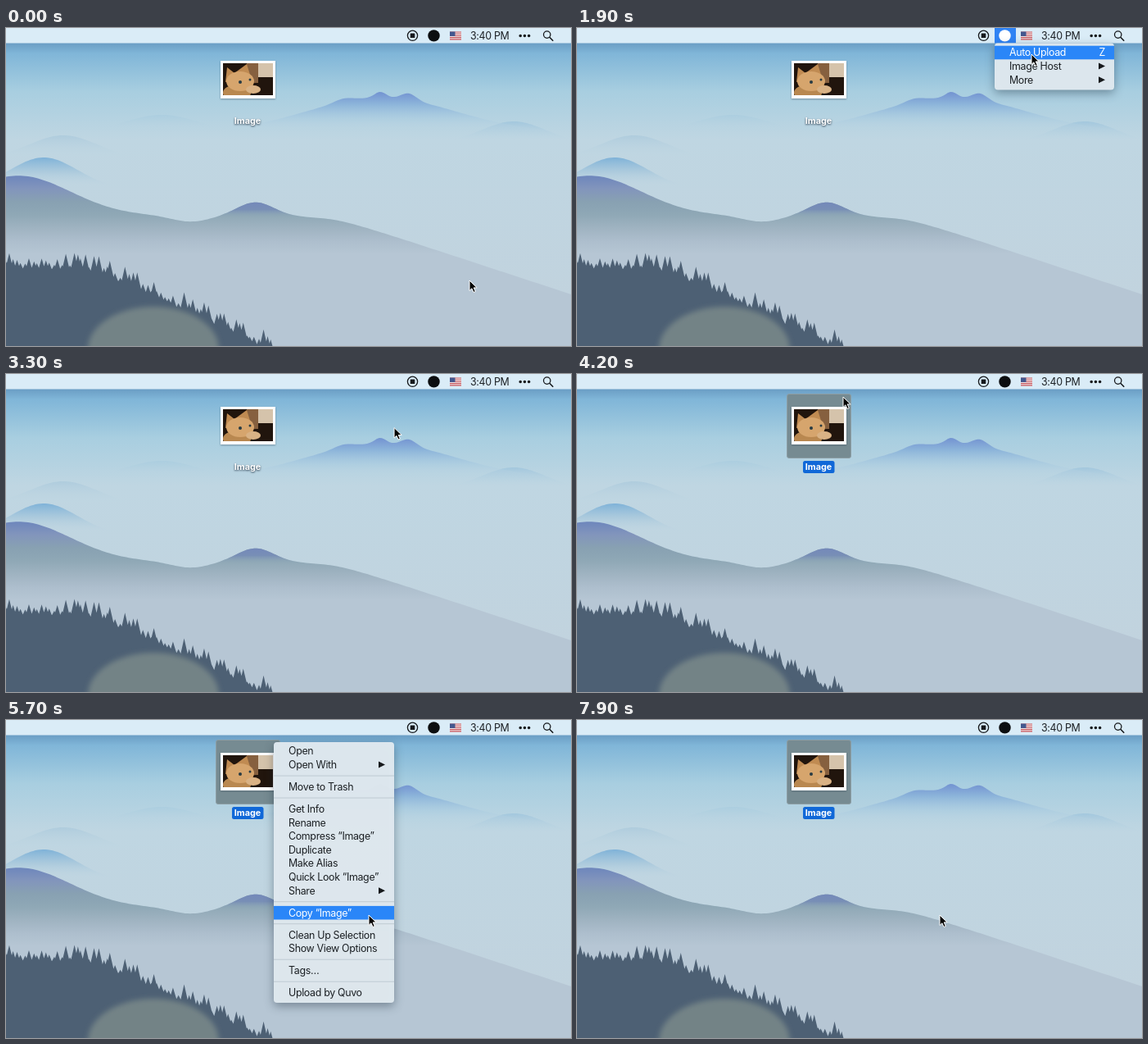
These frames come from a looping animation (690x388 px, 8000 ms). An HTML page:

```html
<!DOCTYPE html>
<html lang="en">
<head>
<meta charset="utf-8">
<title>Desktop upload</title>
<style>
  html, body { margin: 0; width: 100%; height: 100%; overflow: hidden; background: #c4d8e4; }
  svg { display: block; width: 690px; height: 388px; }
  text { font: 12.4px Inter, Roboto, sans-serif; letter-spacing: -.32px; fill: #1c2024; }
  .end { text-anchor: end; }
  #label { font-size: 10.8px; font-weight: 700; letter-spacing: 0; fill: #fff; text-anchor: middle; }
  .plain { filter: drop-shadow(0 1px 1.2px #234); }
  .menu { filter: drop-shadow(0 4px 6px #1236); }
  .on rect { fill: #2a86f8; }
  .on text, .on path { fill: #fff; }
</style>
</head>
<body>
<svg viewBox="0 0 690 388">
  <defs>
    <linearGradient id="sky" x2="0" y2="1">
      <stop offset=".05" stop-color="#6c9fc6"/>
      <stop offset=".08" stop-color="#80b6d8"/>
      <stop offset=".2" stop-color="#a8cee0"/>
      <stop offset=".35" stop-color="#bfd6e2"/>
      <stop offset="1" stop-color="#c2d2dd"/>
    </linearGradient>
    <clipPath id="photo"><rect x="265" y="43" width="61" height="39"/></clipPath>
    <filter id="soft"><feGaussianBlur stdDeviation="3"/></filter>
  </defs>
  <rect width="690" height="388" fill="url(#sky)"/>
  <g id="land"></g>

  <g id="selection">
    <rect x="256.5" y="24.500" width="78" height="78" rx="2.500" fill="#768b92" stroke="#8d9ea4"/>
    <rect x="276" y="106" width="38.500" height="15" rx="2.500" fill="#1068d8"/>
  </g>
  <rect x="262" y="40" width="67" height="46" fill="#fff" style="filter:drop-shadow(0 1px 1px #3457)"/>
  <g clip-path="url(#photo)">
    <rect x="265" y="43" width="61" height="39" fill="#21150d"/>
    <rect x="294" y="43" width="14" height="24" fill="#86603f"/>
    <rect x="308" y="43" width="18" height="17" fill="#d5c3ab"/>
    <ellipse cx="282" cy="79" rx="17" ry="10" fill="#b98850"/>
    <path d="M268 66l2-18 9 7 15-11 5 16z" fill="#c08b52"/>
    <ellipse cx="286" cy="65" rx="17" ry="12" fill="#d6a56d"/>
    <ellipse cx="302" cy="75" rx="9" ry="5" fill="#d9b285"/>
    <circle cx="286" cy="66" r="2" fill="#273b43"/>
    <circle cx="298" cy="63" r="1.500" fill="#273b43"/>
  </g>
  <text id="label" x="295" y="117.300">Image</text>

  <rect width="690" height="18.500" fill="#daecf7"/>
  <rect id="active" x="510" width="26" height="18.500" fill="#2f83f4"/>
  <g fill="none" stroke="#16191c" stroke-width="1.300">
    <circle cx="496.500" cy="9.300" r="6.100"/>
    <circle cx="660.700" cy="8.100" r="4.200"/>
    <path d="M663.800 11.300l4.400 4.400" stroke-width="1.600"/>
    <path d="M628.200 9.500h10.500" stroke-width="3.600" stroke-linecap="round" stroke-dasharray="0 5.200"/>
  </g>
  <rect x="493.700" y="6.500" width="5.600" height="5.600" rx=".6" fill="#16191c"/>
  <circle id="app" cx="522.500" cy="9.400" r="7.200"/>
  <g id="progress" transform="translate(522.500 9.400)" fill="#16191c">
    <circle r="6.700" fill="none" stroke="#16191c" stroke-width="1.300"/><path id="wedge"/>
  </g>
  <rect x="542" y="4.500" width="14" height="10" fill="#f4eeee"/>
  <path d="M549 4.500v10" stroke="#c4525a" stroke-width="14" stroke-dasharray="1.100"/>
  <rect x="542" y="4.500" width="6.500" height="5.400" fill="#42588f"/>
  <text x="567" y="13.800">3:40 PM</text>

  <g id="menus"></g>
  <circle id="ring" cx=".5" cy="1" r="19" fill="#fff3" stroke="#111" stroke-width="1.500"/>
  <path id="cursor" d="M0 0v12.500l2.900-2.700 2.100 4.700 2.300-1-2.100-4.600h4z" fill="#050505" stroke="#fff" stroke-linejoin="round"/>
</svg>
<script>
const $ = id => document.getElementById(id);

function add(parent, tag, attrs, text) {
  const el = document.createElementNS('http://www.w3.org/2000/svg', tag);
  for (const k in attrs) el.setAttribute(k, attrs[k]);
  if (text) el.textContent = text;
  parent.append(el);
  return el;
}

// Landscape: every ridge is a base line with bell-shaped peaks.
const bell = (x, center, height, width) => height * Math.exp(-(((x - center) / width) ** 2));
const ramp = x => (x + Math.hypot(x, 30)) / 2;

let fades = 0;
function hill(ridge, [left, right], [top, bottom], colors) {
  let d = `M${left} 388`;
  for (let x = left; x <= right; x += 3) d += `L${x} ${ridge(x).toFixed(1)}`;
  const id = 'fade' + fades++;
  const fade = add($('land'), 'linearGradient', { id, gradientUnits: 'userSpaceOnUse', x1: 0, x2: 0, y1: top, y2: bottom });
  colors.forEach((c, i) => add(fade, 'stop', { offset: i / (colors.length - 1), 'stop-color': c }));
  add($('land'), 'path', { d: d + `V388Z`, fill: `url(#${id})` });
}

const wide = [0, 690];
hill(x => 160 - bell(x, 70, 29, 60), wide, [131, 158], ['#a5c6da99', '#bfd6e200']);
hill(x => 128 - bell(x, 190, 22, 65), wide, [106, 126], ['#a5cade88', '#bfd6e200']);
hill(x => 140 - bell(x, 620, 26, 55), wide, [114, 138], ['#9cc3dcbb', '#bfd6e200']);
hill(x => 128 - bell(x, 458, 43, 130) - bell(x, 457, 7, 10) - bell(x, 492, 8, 13) - bell(x, 412, 4, 16),
  wide, [76, 126], ['#6f8ed0', '#8cb4da', '#a9cbe0aa', '#bfd6e200']);
hill(x => 196 - bell(x, 46, 38, 58), wide, [158, 193], ['#7fb2d8', '#a8c8dccc', '#bfd6e200']);

const near = x => 229 + .33 * ramp(x - 400) - bell(x, 15, 49, 90) + bell(x, 225, 7, 32) - bell(x, 305, 17, 32);
hill(near, wide, [180, 276], ['#6d86bc', '#8295bc', '#88a1b2', '#8fa8b6', '#9fb3c1', '#adbecd', '#b6c6d4']);
hill(near, [225, 420], [212, 231], ['#7388ba', '#788fb6', '#8ea8b700']);

// Pine forest on a falling slope, with mist at its foot.
let seed = 11;
const rand = () => (seed = seed * 16807 % 2147483647) / 2147483647;
const ground = x => 292 + .47 * ramp(x - 108);
let forest = 'M-10 388';
for (let x = -10; x <= 330; x += 5) forest += `L${x} ${ground(x)}`;
forest += 'V388Z';
for (let x = -4; x < 325; x += 3 + rand() * 4) {
  const h = 5 + 17 * rand() ** 1.6, w = 2.5 + h / 6, y = ground(x) - h;
  for (let tier = 1; tier <= 3; tier++)
    forest += `M${x} ${y}L${x + w * tier / 3} ${y + h * tier / 2.4}H${x - w * tier / 3}Z`;
}
add($('land'), 'path', { d: forest, fill: '#4d6074' });
add($('land'), 'ellipse', { cx: 180, cy: 392, rx: 80, ry: 52, fill: '#738386', filter: 'url(#soft)' });

// Rows are "Label", "Label>" for a submenu, "Label|Key" for a shortcut, "" for a divider.
const ROW = 16.6;
function makeMenu(x, y, w, h, first, rows) {
  const g = add($('menus'), 'g', { class: 'menu' }), items = [];
  add(g, 'rect', { x, y, width: w, height: h, rx: 4, fill: '#e0eaf0', 'fill-opacity': .97 });
  let cy = first;
  for (const row of rows) {
    if (!row) {
      add(g, 'rect', { x, y: cy - 3.8, width: w, height: 1.3, fill: '#c5d0d7' });
      cy += 10.4;
      continue;
    }
    const [label, key] = row.replace('>', '').split('|');
    const el = add(g, 'g', {});
    add(el, 'rect', { x, y: cy - ROW / 2, width: w, height: ROW, fill: 'none' });
    add(el, 'text', { x: x + 18, y: cy + 4.4 }, label);
    if (key) add(el, 'text', { x: x + w - 11, y: cy + 4.4, class: 'end' }, key);
    if (row.endsWith('>')) add(el, 'path', { d: `M${x + w - 19},${cy - 4}l8,4 -8,4Z`, fill: '#16191c' });
    items.push({ el, cy });
    cy += ROW;
  }
  return (alpha, pointerY) => {
    g.style.display = alpha > 0 ? '' : 'none';
    g.style.opacity = alpha;
    for (const { el, cy } of items)
      el.setAttribute('class', Math.abs(pointerY - cy) < ROW / 2 ? 'on' : '');
  };
}

const showAppMenu = makeMenu(510, 18.5, 146, 57, 30, ['Auto Upload|Z', 'Image Host>', 'More>']);
const showFileMenu = makeMenu(327, 27, 147, 318, 38, [
  'Open', 'Open With>', '', 'Move to Trash', '', 'Get Info', 'Rename', 'Compress “Image”', 'Duplicate',
  'Make Alias', 'Quick Look “Image”', 'Share>', '', 'Copy “Image”', '', 'Clean Up Selection',
  'Show View Options', '', 'Tags…', '', 'Upload by Quvo']);

// Each move glides the pointer to a new place.
const moves = [
  { from: 200, to: 900, x: 522, y: 8 },
  { from: 1300, to: 1800, x: 555, y: 32 },
  { from: 2200, to: 2500, x: 555, y: 86 },
  { from: 2900, to: 3900, x: 325, y: 28 },
  { from: 4400, to: 5400, x: 443, y: 238 },
];
const clicks = [1000, 2000, 4000, 5800];

function pointer(t) {
  let x = 566, y = 308;
  for (const m of moves) {
    const u = Math.min(1, Math.max(0, (t - m.from) / (m.to - m.from))), ease = u * u * (3 - 2 * u);
    x += (m.x - x) * ease;
    y += (m.y - y) * ease;
  }
  return [x, y];
}

// Opacity of something that appears at `start` and fades from `fade` to `end`.
const life = (t, start, fade, end) => t < start || t >= end ? 0 : Math.min(1, (end - t) / (end - fade));
const show = (id, on) => $(id).style.display = on ? '' : 'none';

function draw(t) {
  const [x, y] = pointer(t);
  const open = t >= 1100 && t < 2700, chosen = t >= 4100, busy = t >= 6300 && t < 7500;
  showAppMenu(life(t, 1100, 2400, 2700), t >= 2000 ? 30 : y);
  showFileMenu(life(t, 4300, 5900, 6200), y);
  show('active', open);
  show('selection', chosen);
  $('label').setAttribute('class', chosen ? '' : 'plain');
  show('app', !busy);
  $('app').setAttribute('fill', open ? '#fff' : '#0c0e10');
  show('progress', busy);
  const turn = Math.max(0, t - 6300) / 1300, a = turn * 2 * Math.PI;
  $('wedge').setAttribute('d', `M0 0V-6.7A6.7 6.7 0 ${+(turn > .5)} 1 ${6.7 * Math.sin(a)} ${-6.7 * Math.cos(a)}Z`);
  show('ring', clicks.some(c => t >= c && t < c + 200));
  for (const id of ['ring', 'cursor']) $(id).setAttribute('transform', `translate(${x} ${y})`);
}

const start = performance.now();
function tick() {
  draw(Math.floor((performance.now() - start) % 8000 / 100) * 100);
  requestAnimationFrame(tick);
}
tick();
</script>
</body>
</html>
```
